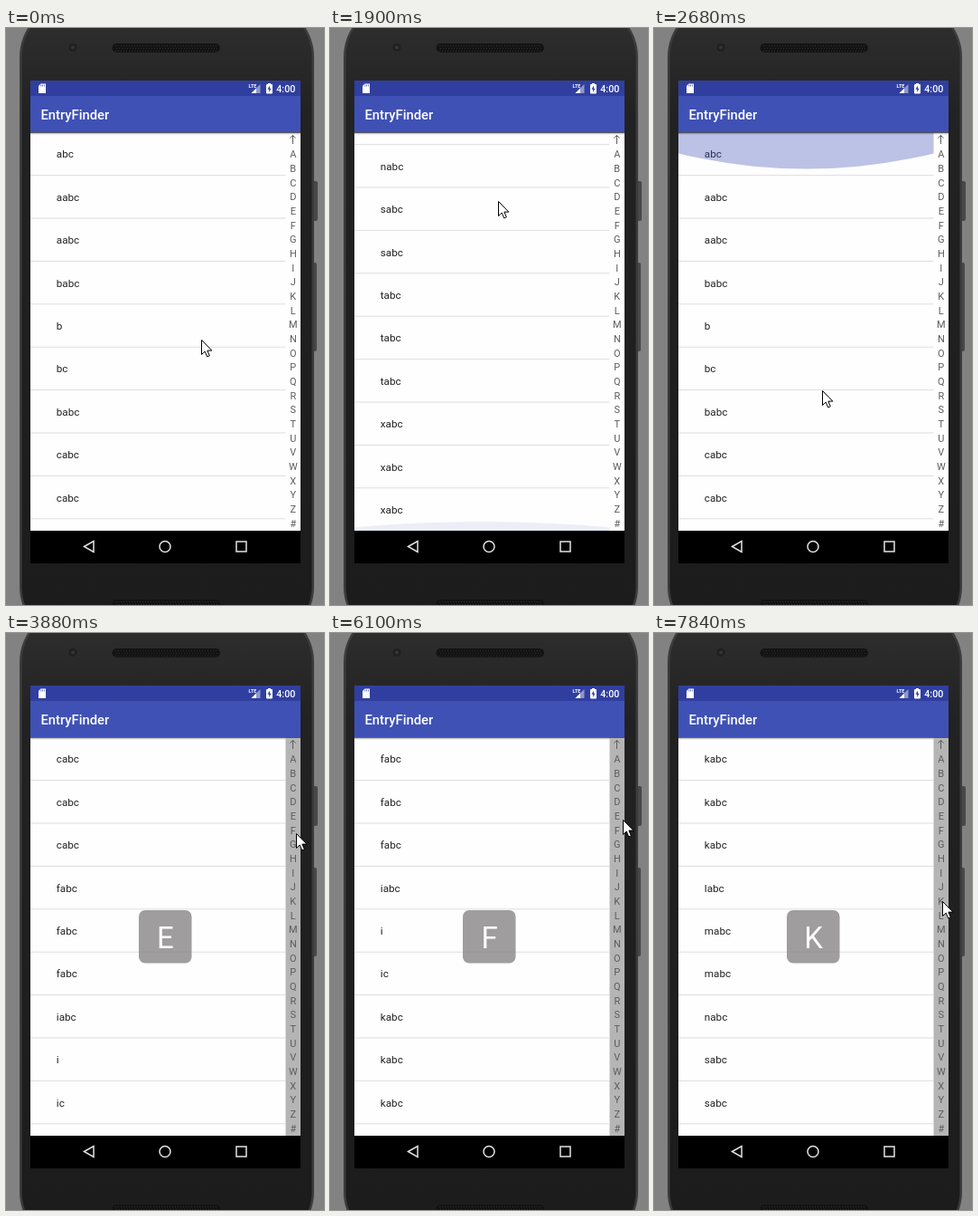
An HTML page with a canvas for the animation above (7.99 s loop, 352 px wide and 637 px high).

```html
<!DOCTYPE html>
<html lang="en">
<head>
<meta charset="utf-8">
<title>Letter list</title>
<style>
  html, body { margin: 0; width: 100%; height: 100%; overflow: hidden; background: #828282; }
  canvas { display: block; }
</style>
</head>
<body>
<canvas id="stage" width="352" height="637"></canvas>
<script>
const ctx = document.getElementById('stage').getContext('2d');
const LOOP = 7990, TICK = 134;
const SCREEN = { left: 27, width: 299 };
const LIST = { top: 115.5, bottom: 555.5, width: 282.5 };
const ROW = 47.4, LETTER_STEP = 15.67;
const PRESS = 3450, TOUCH_LAG = 130;
const repeat = (label, count) => Array(count).fill(label);
const rows = ['abc', ...repeat('aabc', 2), 'babc', 'b', 'bc', 'babc',
  ...['cabc', 'fabc'].flatMap(label => repeat(label, 3)), 'iabc', 'i', 'ic',
  ...repeat('kabc', 3), 'labc', ...repeat('mabc', 2), 'nabc', ...repeat('sabc', 2),
  ...['tabc', 'xabc'].flatMap(label => repeat(label, 3))];
const letters = '↑ABCDEFGHIJKLMNOPQRSTUVWXYZ#';
const MAX_SCROLL = rows.length * ROW - (LIST.bottom - LIST.top);

// Places where the cursor turns or rests: time, x, y
const stops = [[0, 216, 344], [400, 283, 291], [780, 214, 370], [1000, 214, 370], [1340, 215, 168],
  [1876, 186, 191], [2680, 186, 400], [2815, 215, 572], [3350, 320, 130], [3886, 321, 221],
  [4900, 320, 480], [6030, 324, 206], [6700, 334, 127], [7772, 319, 296]];

const clamp = (v, min, max) => Math.max(min, Math.min(max, v));
const smooth = u => u * u * (3 - 2 * u);
const fling = (t, start, duration) => 1 - (1 - clamp((t - start) / duration, 0, 1)) ** 3;
const pulse = (t, peak) => Math.max(0, 1 - Math.abs(t - peak) / 320);

function cursorAt(t) {
  const next = stops.findIndex(stop => stop[0] > t);
  if (next < 0) return stops[stops.length - 1].slice(1);
  const [t0, x0, y0] = stops[next - 1], [t1, x1, y1] = stops[next];
  const k = smooth((t - t0) / (t1 - t0));
  return [x0 + (x1 - x0) * k, y0 + (y1 - y0) * k];
}

function rect(x, y, w, h, color) {
  ctx.fillStyle = color;
  ctx.fillRect(x, y, w, h);
}

function round(x, y, w, h, r, color) {
  ctx.fillStyle = color;
  ctx.beginPath();
  ctx.roundRect(x, y, w, h, r);
  ctx.fill();
}

function disc(x, y, r, color) {
  ctx.fillStyle = color;
  ctx.beginPath();
  ctx.arc(x, y, r, 0, 7);
  ctx.fill();
}

function shape(points, fill, stroke, width = 1) {
  ctx.beginPath();
  points.forEach(([x, y]) => ctx.lineTo(x, y));
  ctx.closePath();
  if (fill) { ctx.fillStyle = fill; ctx.fill(); }
  if (stroke) { ctx.strokeStyle = stroke; ctx.lineWidth = width; ctx.stroke(); }
}

function text(str, x, y, size, color, align = 'left', weight = 400) {
  ctx.font = `${weight} ${size}px Roboto, sans-serif`;
  ctx.textAlign = align;
  ctx.fillStyle = color;
  ctx.fillText(str, x, y);
}

function drawSpeaker(y) {
  round(117.5, y, 119.5, 10, 5, '#131313');
  for (let x = 121; x < 235; x += 3)
    for (let dy = 2; dy < 9; dy += 3) rect(x + dy % 2, y + dy, 1, 1, '#2e2e2e');
}

function drawPhone() {
  rect(0, 0, 352, 637, '#828282');
  round(339, 169, 6, 44, 2, '#484848');
  round(339, 259, 5, 98, 2, '#484848');
  round(15, -28, 326, 705, 60, '#3c3c3c');
  const body = ctx.createLinearGradient(0, 0, 0, 637);
  body.addColorStop(0, '#2d2d2d');
  body.addColorStop(.15, '#222');
  body.addColorStop(1, '#1c1c1c');
  round(17.5, -26, 321, 701, 58, body);
  disc(74, 21.5, 4.5, '#202020');
  disc(74, 21.5, 2, '#33363a');
  drawSpeaker(17);
  drawSpeaker(631);
}

function drawBars() {
  const { left, width } = SCREEN;
  rect(left, 58, width, 17, '#303f9f');
  rect(left, 75, width, 40, '#3f51b5');
  [.42, .2, .07].forEach((alpha, i) => rect(left, 115 + i, width, 1, `rgba(0,0,0,${alpha})`));
  text('EntryFinder', 38.5, 101, 14.8, '#fff', 'left', 500);

  shape([[38.5, 61.5], [44, 61.5], [44, 72], [36, 72], [36, 64]], '#fff');
  for (let x = 38.5; x < 43; x += 1.8) rect(x, 62.5, .7, 2, '#303f9f');
  text('LTE', 268.5, 66, 5.5, '#fff', 'left', 700);
  shape([[281.5, 62], [281.5, 72], [271.5, 72]], '#8f98cc');
  shape([[277, 66.5], [277, 72], [271.5, 72]], '#fff');
  rect(290, 61, 3, 2, '#fff');
  round(288, 62, 7, 10.5, 1, '#fff');
  shape([[292, 63.5], [289.5, 67.8], [291.2, 67.8], [291, 71], [293.6, 66.7], [292, 66.7]], '#303f9f');
  text('4:00', 299.3, 71, 10.7, '#fff', 'left', 500);

  rect(left, 555, width, 36, '#000');
  shape([[86.5, 572.5], [97, 566.5], [97, 578.5]], null, '#e4e4e4', 1.5);
  ctx.beginPath();
  ctx.arc(176, 572.5, 6, 0, 7);
  ctx.stroke();
  ctx.strokeRect(255, 567, 11, 11);
}

function drawGlow(amount, edge, direction) {
  if (!amount) return;
  const depth = 40 * amount, sag = 17 * amount ** .75, half = LIST.width / 2;
  const radius = (half * half + sag * sag) / (2 * sag);
  disc(SCREEN.left + half, edge + direction * (depth - radius), radius, `rgba(63,81,181,${.35 * amount})`);
}

function drawList(scroll, t) {
  rect(SCREEN.left, LIST.top, SCREEN.width, LIST.bottom - LIST.top, '#fefefe');
  ctx.save();
  ctx.beginPath();
  ctx.rect(SCREEN.left, LIST.top, LIST.width, LIST.bottom - LIST.top);
  ctx.clip();
  rows.forEach((label, i) => {
    const y = LIST.top + i * ROW - scroll;
    text(label, 55.8, Math.round(y + 27.85), 11.7, '#222');
    rect(SCREEN.left, y + ROW - .8, LIST.width, 1, '#dedede');
  });
  drawGlow(pulse(t, 2680), LIST.top, 1);
  drawGlow(pulse(t, 1640), LIST.bottom, -1);
  ctx.restore();
}

function drawIndex(pressed) {
  const left = SCREEN.left + LIST.width;
  if (pressed) rect(left, 116, SCREEN.left + SCREEN.width - left, 439, '#b5b5b5');
  [...letters].slice(1).forEach((letter, i) =>
    text(letter, 317.8, 143.2 + i * LETTER_STEP, 11, '#5c5c5c', 'center'));
  ctx.strokeStyle = '#5c5c5c';
  ctx.lineWidth = 1;
  ctx.beginPath();
  ctx.moveTo(317.5, 128);
  ctx.lineTo(317.5, 118.5);
  ctx.moveTo(314.5, 121.5);
  ctx.lineTo(317.5, 118.5);
  ctx.lineTo(320.5, 121.5);
  ctx.stroke();
}

function drawPopup(letter) {
  round(147, 306, 58.5, 58.5, 7, 'rgba(138,136,137,.82)');
  text(letter, 176.5, 348, 33, '#fff', 'center');
}

function drawCursor([x, y]) {
  const outline = [[0, 0], [0, 16], [3.7, 12.6], [6.2, 18.4], [8.8, 17.3], [6.4, 11.6], [11.4, 11.6]];
  shape(outline.map(([dx, dy]) => [Math.round(x) + .5 + dx, Math.round(y) + .5 + dy]), '#fff', '#000');
}

function touchedLetter(t) {
  const y = cursorAt(t - TOUCH_LAG)[1];
  return clamp(Math.floor((y - 116) / LETTER_STEP), 0, letters.length - 1);
}

// First row of the last section at or before the touched letter
function sectionScroll(index) {
  const sectionOf = label => letters.indexOf(label[0].toUpperCase());
  const section = Math.max(1, ...rows.map(sectionOf).filter(i => i <= index));
  const row = rows.findIndex(label => sectionOf(label) === section);
  return Math.min(row * ROW, MAX_SCROLL);
}

function draw(now) {
  const t = Math.floor((now % LOOP + 10) / TICK) * TICK;
  const pressed = t >= PRESS;
  const index = pressed ? touchedLetter(t) : 0;
  const flung = MAX_SCROLL * (fling(t, 1000, 746) - fling(t, 2140, 440));
  drawPhone();
  drawList(pressed ? sectionScroll(index) : flung, t);
  drawBars();
  drawIndex(pressed);
  if (pressed) drawPopup(letters[index]);
  drawCursor(cursorAt(t));
}

const began = performance.now();
function tick() {
  draw(performance.now() - began);
  requestAnimationFrame(tick);
}
tick();
</script>
</body>
</html>
```
